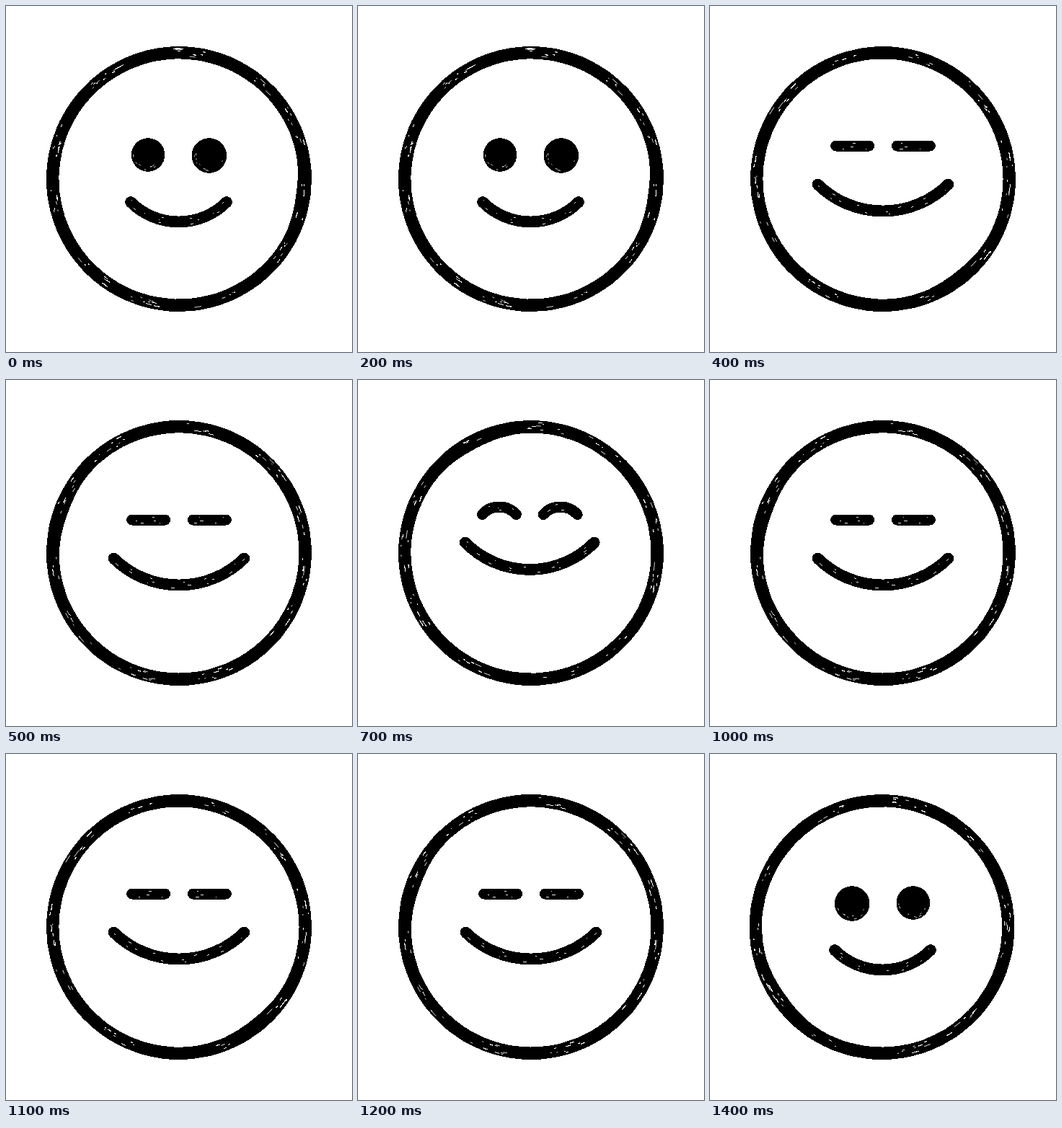
An HTML page for the animation above (1.5 s loop, 480 by 480 pixels).

```html
<!DOCTYPE html>
<html lang="en">
<head>
<meta charset="utf-8">
<title>Hand-drawn smiley</title>
<style>
  html, body { margin: 0; width: 100%; height: 100%; overflow: hidden; background: #fff; }
  svg { display: block; width: 100vw; height: 100vh; }
  g { opacity: 0; }
</style>
</head>
<body>
<svg id="stage" viewBox="0 0 480 480" shape-rendering="crispEdges" fill="none" stroke-linecap="round"></svg>
<script>
const FRAME = 100;
// One letter per drawing; each face alternates between two drawings.
const ORDER = 'ABAcCcdDdDcCcAB';

// x is the middle of the face; both eyes sit EYE_GAP to its sides.
const EYE_GAP = 42.4;
const FACES = {
  open: { x: 239.5, mouth: { y: 272, half: 66.5, sag: 27.5 }, eye: { y: 207, radius: 23.8 } },
  calm: { x: 240, mouth: { y: 247.5, half: 90.5, sag: 37 }, eye: { y: 194, half: 23, sag: 0 } },
  happy: { x: 238.3, mouth: { y: 225.5, half: 89.5, sag: 37.5 }, eye: { y: 186.5, half: 23.5, sag: -10.5 } }
};

// heavy: angle where the ring is thickest, clockwise from the right; lean: which eye is larger.
const DRAWINGS = {
  A: { face: 'open', seed: 11, cx: 240, heavy: 8, lean: 0.5 },
  B: { face: 'open', seed: 23, cx: 238.5, heavy: 145, lean: -0.5 },
  C: { face: 'calm', seed: 37, cx: 240, heavy: 52 },
  c: { face: 'calm', seed: 41, cx: 240, heavy: 200 },
  D: { face: 'happy', seed: 59, cx: 240, heavy: 243 },
  d: { face: 'happy', seed: 67, cx: 240, heavy: 50 }
};

const stage = document.getElementById('stage');
const RAD = Math.PI / 180;

function random(seed) {
  return () => {
    seed = (seed * 16807) % 2147483647;
    return seed / 2147483647;
  };
}

function add(parent, tag, attrs) {
  const el = document.createElementNS('http://www.w3.org/2000/svg', tag);
  for (const key in attrs) el.setAttribute(key, attrs[key]);
  return parent.appendChild(el);
}

function at(cx, cy, r, deg) {
  return (cx + r * Math.cos(deg * RAD)).toFixed(2) + ' ' + (cy + r * Math.sin(deg * RAD)).toFixed(2);
}

function loop(cx, radius) {
  const pts = [];
  for (let a = 0; a < 360; a += 2) pts.push(at(cx, 240, radius(a), a));
  return 'M' + pts.join('L') + 'Z';
}

// Short white mark along a circle, left by the dry brush.
function scratch(g, cx, cy, r, deg, span, width) {
  add(g, 'path', {
    d: `M${at(cx, cy, r, deg)}A${r} ${r} 0 0 1 ${at(cx, cy, r, deg + span)}`,
    stroke: '#fff', 'stroke-width': width
  });
}

function ring(g, { cx, heavy }, rnd) {
  const inner = a => {
    const off = (a - heavy + 540) % 360 - 180;
    return 166.5 - 2.5 * Math.exp(-((off / 15) ** 2));
  };
  const rough = () => (rnd() - 0.5) * 0.4;
  add(g, 'path', {
    d: loop(cx, () => 183.9 + rough()) + loop(cx, a => inner(a) + rough()),
    fill: '#000', 'fill-rule': 'evenodd'
  });

  // Scratches come in clusters spread around the ring.
  for (let start = 0; start < 360; start += 24 + rnd() * 18) {
    const count = 3 + rnd() * 7;
    for (let i = 0; i < count; i++) {
      scratch(g, cx, 240, 170 + rnd() * 11, start + rnd() * 18, 0.4 + rnd() * rnd() * 4, 0.8 + rnd() * 0.5);
    }
  }
}

function stroke(g, x, { y, half, sag }, width, rnd) {
  const r = sag ? (half * half + sag * sag) / (2 * Math.abs(sag)) : 0;
  const d = `M${x - half} ${y}A${r} ${r} 0 0 ${sag > 0 ? 0 : 1} ${x + half} ${y}`;
  add(g, 'path', { d, stroke: '#000', 'stroke-width': width });
  for (const dy of [-3.5, 1, 4.5]) {
    add(g, 'path', {
      d, stroke: '#fff', 'stroke-width': 0.9, 'stroke-linecap': 'butt',
      'stroke-dasharray': `${1 + rnd() * 4} ${20 + rnd() * 30} ${1 + rnd() * 3} ${25 + rnd() * 40}`,
      'stroke-dashoffset': -rnd() * 30,
      transform: `translate(0 ${dy})`
    });
  }
}

function dot(g, x, y, r, rnd) {
  add(g, 'circle', { cx: x, cy: y, r, fill: '#000' });
  for (let i = 0; i < 8; i++) {
    scratch(g, x, y, r * (0.7 + rnd() * 0.2), 20 + rnd() * 170, 2 + rnd() * 7, 0.9);
  }
}

for (const [name, drawing] of Object.entries(DRAWINGS)) {
  const { x, mouth, eye } = FACES[drawing.face];
  const rnd = random(drawing.seed * 7919);
  const g = add(stage, 'g', {});

  ring(g, drawing, rnd);
  stroke(g, x, mouth, 15.8, rnd);
  for (const side of [-1, 1]) {
    const ex = x + side * EYE_GAP;
    const grow = side * drawing.lean;
    if (eye.radius) dot(g, ex, eye.y + grow, eye.radius + grow, rnd);
    else stroke(g, ex, eye, 15, rnd);
  }

  const steps = [...ORDER, ORDER[0]].map((key, i) => ({
    offset: i / ORDER.length,
    opacity: key === name ? 1 : 0,
    easing: 'step-end'
  }));
  g.animate(steps, { duration: ORDER.length * FRAME, iterations: Infinity });
}
</script>
</body>
</html>
```
